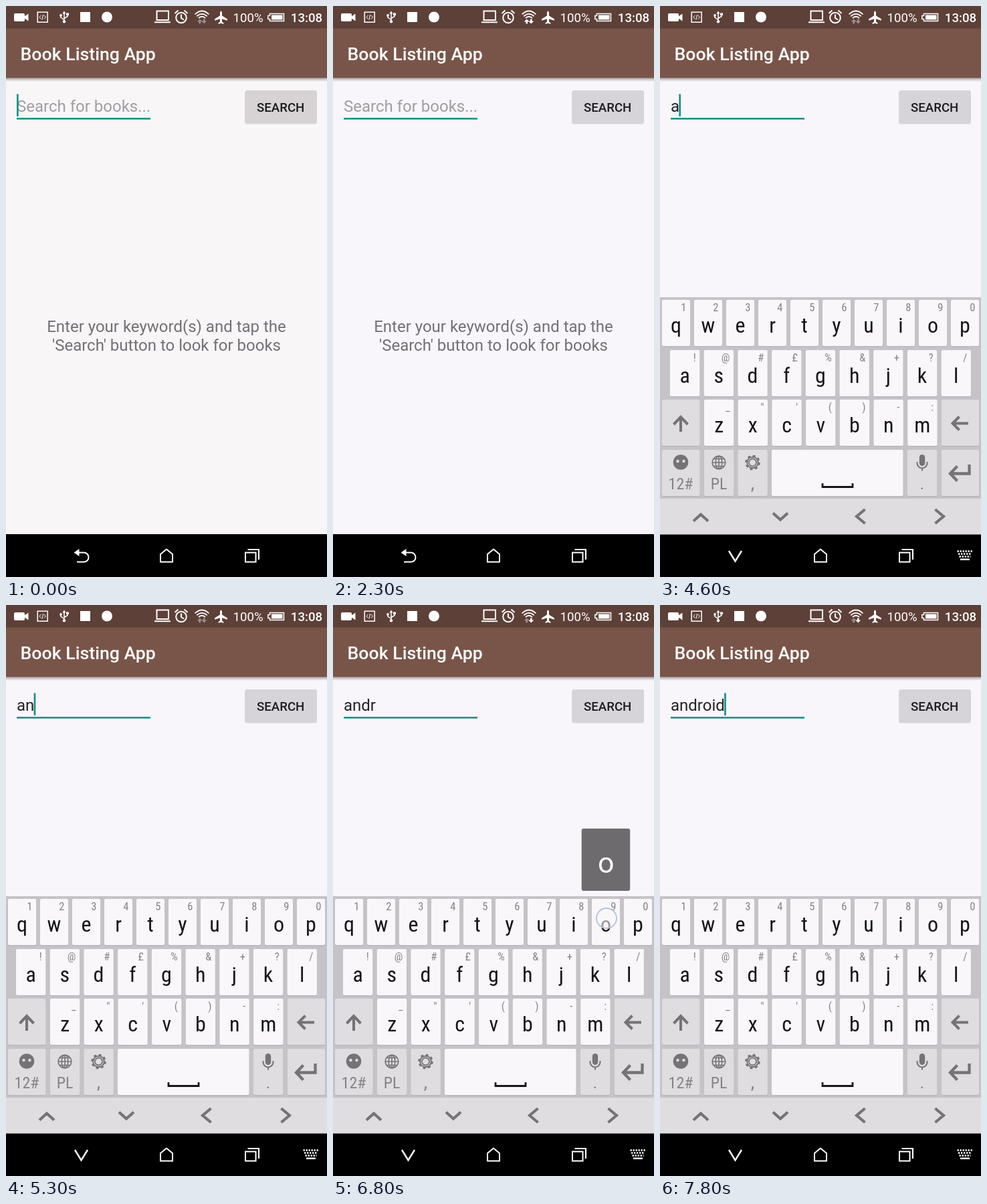
Recreate the animation shown at these times as an HTML page. Size 480 by 853 pixels, loop 8000 ms.

```html
<!DOCTYPE html>
<html lang="en">
<head>
<meta charset="utf-8">
<title>Book search</title>
<style>
  html, body { margin: 0; width: 100%; height: 100%; overflow: hidden; background: #000; }
  svg { display: block; width: 100%; height: 100%; font-family: Roboto, "Noto Sans", sans-serif; }
  .medium { font-weight: 500; }
  .mid { text-anchor: middle; }
  .end { text-anchor: end; }
  .line { fill: none; }
  .keys { font-family: "Roboto Condensed", Roboto, sans-serif; font-stretch: 75%; }
</style>
</head>
<body>
<svg id="stage" viewBox="0 0 480 853">
  <defs>
    <linearGradient id="shade" x2="0" y2="1">
      <stop stop-color="#000" stop-opacity=".34"/>
      <stop offset="1" stop-color="#000" stop-opacity="0"/>
    </linearGradient>
  </defs>

  <rect id="page" width="480" height="790"/>
  <rect y="107" width="480" height="6" fill="url(#shade)"/>
  <rect y="33" width="480" height="74.5" fill="#795549"/>
  <rect width="480" height="33.5" fill="#5d4038"/>
  <text class="medium" x="21.5" y="81" font-size="26.67" fill="#fff">Book Listing App</text>

  <g id="status" fill="#fff" stroke="none">
    <rect x="12" y="11" width="16" height="12" rx="2"/>
    <path d="M27 16l6.500-4.500v11l-6.500-4.500z"/>
    <rect class="line" x="47.200" y="9.200" width="15" height="15" stroke="#fff" stroke-width="1.500"/>
    <path class="line" d="M52.500 14l-2.700 2.700 2.700 2.700M57 14l2.700 2.700-2.700 2.700M55.700 13l-1.800 7.500" stroke="#fff"/>
    <path class="line" d="M87 10v13M87 20.500l-5-3.500v-3M87 18.500l5-3v-3" stroke="#fff" stroke-width="1.500"/>
    <path d="M87 7.500l2.600 4h-5.200zM90 10.500h4v3.500h-4z"/>
    <circle cx="82" cy="14" r="1.900"/><circle cx="87" cy="23.300" r="2.200"/>
    <rect x="111" y="9" width="15" height="15"/>
    <circle cx="151" cy="16.500" r="8"/>
    <path class="line" d="M225.500 7.500h17.500v13.500h-17.500zM222 24.300h24" stroke="#fff" stroke-width="2"/>
    <g class="line" stroke="#fff" stroke-width="2">
      <circle cx="262" cy="17.500" r="7.800"/>
      <path d="M262 12.500v5.500l4 2.500M252.500 11l5-4.500M271.500 11l-5-4.500"/>
    </g>
    <g class="line" stroke="#fff" stroke-width="1.700">
      <path d="M282.500 12.500q10.500-10 21 0M285.300 15.300q7.700-7 15.400 0M288 18q5-4.500 10 0"/>
    </g>
    <path id="up" d="M289.700 19.500l4 4h-2.700v3h-2.600v-3h-2.700z"/>
    <path id="down" d="M296.300 26.500l4-4h-2.700v-3h-2.600v3h-2.700z"/>
    <path d="M320 9.500q1.500-4 3 0v5l8 5v2.200l-8-2.500v4.300l2.400 1.800v1.700l-3.900-1.200-3.900 1.200v-1.700l2.400-1.800v-4.300l-8 2.500v-2.200l8-5z"/>
    <text x="339.500" y="24" font-size="18.670">100%</text>
    <path class="line" d="M394.500 11.500h21v11h-21v-3h-2.700v-5h2.700z" stroke="#fff" stroke-width="1.500"/>
    <rect x="397" y="13.500" width="16.500" height="7"/>
    <text class="medium" x="425.800" y="24" font-size="18.670">13:08</text>
  </g>

  <text id="field" x="16" y="158" font-size="24"></text>
  <rect x="16" y="167" width="200" height="2.600" fill="#159389"/>
  <rect id="cursor" y="131.500" width="2.700" height="33.500" fill="#159389"/>

  <rect x="357" y="126.500" width="108" height="50" rx="3.500" fill="#000" opacity=".13"/>
  <rect id="button" x="358" y="126" width="106.500" height="48.500" rx="2.500"/>
  <text class="medium mid" x="410.700" y="157.500" font-size="18.670" fill="#1c1b1d">SEARCH</text>

  <g class="mid" font-size="24" fill="#727074">
    <text x="240" y="487">Enter your keyword(s) and tap the</text>
    <text x="240" y="515">'Search' button to look for books</text>
  </g>

  <rect y="789" width="480" height="64" fill="#000"/>
  <g id="board"></g>

  <g class="line" stroke="#fff" stroke-width="2">
    <g id="back">
      <path d="M106 816.500h10.500a6.800 6.800 0 0 1 0 14h-10.500"/>
      <path d="M101.500 816.500l8-5.500v11z" fill="#fff" stroke="none"/>
    </g>
    <path id="hide" d="M103 814l9.500 15.500 9.500-15.500" stroke-width="2.400"/>
    <path d="M231 830.500v-11.500l9-7.500 9 7.500v11.500z"/>
    <path d="M358 816.500h15.500v14h-15.500zM361.500 812h16.500v15"/>
    <g id="switcher" stroke-width="2.400">
      <path d="M444.500 814.500h23M446 818.500h20M447.500 822.500h17" stroke-dasharray="2.400 1.600"/>
      <path d="M449 826.700h14"/>
    </g>
  </g>

  <g id="popup">
    <rect width="72.500" height="93" rx="3" fill="#6d6b6e"/>
    <text id="bubble" class="mid" x="36.500" y="66" font-size="43" fill="#fff"></text>
  </g>
  <circle id="touch" r="15" fill="#f9f7fb" fill-opacity=".58" stroke="#b6c0dc" stroke-width="1.800"/>
</svg>

<script>
const $ = id => document.getElementById(id);
const set = (id, attrs) => {
  for (const k in attrs) $(id).setAttribute(k, attrs[k]);
};
const show = (id, on) => set(id, { visibility: on ? "visible" : "hidden" });

const LOOP = 8000, STEP = 100, BLINK = 500;
const LIGHT = "#f9f7fa", DULL = "#dfdde0", GREY = "#757376";
const keys = {};

// Keyboard
function plate(x, y, w, fill) {
  return `<rect x="${x}" y="${y + 1.2}" width="${w}" height="69" rx="2" fill="#b5b3b7"/>
    <rect x="${x}" y="${y}" width="${w}" height="69" rx="2" fill="${fill}"/>`;
}

function letterRow(letters, marks, x0, pitch, w, y) {
  return [...letters].map((c, i) => {
    const x = x0 + i * pitch;
    keys[c] = { x: x + w / 2, y };
    return plate(x, y, w, LIGHT) +
      `<text class="mid" x="${x + w / 2}" y="${y + 48.5}" font-size="32" fill="#161517">${c}</text>
       <text class="end" x="${x + w - 5.5}" y="${y + 16.5}" font-size="16.500" fill="#858386">${marks[i]}</text>`;
  }).join("");
}

function label(s, x, size = 24) {
  return `<text class="mid" x="${x}" y="722" font-size="${size}" fill="#858386">${s}</text>`;
}

function stroke(d, width, color = GREY) {
  return `<path class="line" d="${d}" stroke="${color}" stroke-width="${width}"/>`;
}

function buildBoard() {
  const side = [[3, 588, 56.5], [421, 588, 56], [3, 663, 56.5], [66, 663, 44.3],
    [116.5, 663, 44.3], [370, 663, 44.3], [421, 663, 56]];
  $("board").innerHTML = `<rect y="435" width="480" height="302" fill="#c5c3c7"/>
    <rect y="736" width="480" height="53.500" fill="${DULL}"/>
    <g class="keys">` +
    letterRow("qwertyuiop", "1234567890", 3, 48, 42, 439) +
    letterRow("asdfghjkl", "!@#£%&amp;+?/".replace("&amp;", "&"), 15, 50.7, 44.3, 514) +
    letterRow("zxcvbnm", "_\"'()-:", 66, 50.7, 44.3, 588) +
    side.map(([x, y, w]) => plate(x, y, w, DULL)).join("") +
    plate(167, 663, 196.5, LIGHT) +
    label("12#", 31) + label("PL", 88) + label(",", 138.5, 27) + label(".", 392) + "</g>" +
    stroke("M31 636v-22M20.500 625l10.500-11 10.500 11", 4) +
    stroke("M461 623.500h-23M447.500 613.500l-10 10 10 10", 4) +
    stroke("M462.500 685v13.500h-28M444.500 687.500l-10.500 11 10.500 11", 4.3) +
    stroke("M243 713v5.500h45v-5.500", 2.8, "#161517") +
    `<circle cx="31" cy="681.500" r="11.300" fill="${GREY}"/>
     <circle cx="26.500" cy="680" r="2.200" fill="${DULL}"/><circle cx="35.500" cy="680" r="2.200" fill="${DULL}"/>
     <g class="line" stroke="${GREY}" stroke-width="1.600">
       <circle cx="88" cy="682" r="9.800"/><ellipse cx="88" cy="682" rx="4.800" ry="9.800"/>
       <path d="M88 672v20M78 682h20M80 676.500h16M80 687.500h16"/>
       <circle cx="138.500" cy="682" r="5.500" stroke-width="1.800"/>
       <circle cx="138.500" cy="682" r="8.300" stroke-width="2"/>
       <circle cx="138.500" cy="682" r="10" stroke-width="2.600" stroke-dasharray="3.930 3.930"/>
       <path d="M384.500 681v2a7.500 7.500 0 0 0 15 0v-2M392 690.500v4" stroke-width="2"/>
     </g>
     <rect x="387.800" y="670" width="8.400" height="17" rx="4.200" fill="${GREY}"/>` +
    stroke("M50 769.500l11-10 11 10M169 757.500l11 10 11-10M306.500 752l-12.500 10.500 12.500 10.500M411.500 752l12.500 10.500-12.500 10.500", 4.2);
}

// Typing: key, time pressed, time the letter lands
const presses = [["a", 4300, 4400], ["n", 5000, 5100], ["d", 5700, 5800], ["r", 6100, 6100],
  ["o", 6800, 6900], ["i", 7100, 7200], ["d", 7500, 7600]];
const FOCUS = 3300;

function mix(a, b, p) {
  return `rgb(${a.map((v, i) => Math.round(v + (b[i] - v) * p))})`;
}

function drawField(t) {
  const landed = presses.filter(p => p[2] <= t);
  const typed = landed.map(p => p[0]).join("");
  const field = $("field");
  field.textContent = typed || "Search for books...";
  set("field", { fill: typed ? "#232224" : "#a09ea1" });
  const since = typed ? t - landed[landed.length - 1][2] : t + 200;
  set("cursor", { x: typed ? 15.3 + field.getComputedTextLength() : 16 });
  show("cursor", since % (2 * BLINK) < BLINK);
}

function drawTouch(t) {
  const press = presses.find(p => t >= p[1] && t < p[2] + 200);
  show("popup", press && t < press[2] + 100);
  let x = 162, y = 150, alpha = 0;
  if (press) {
    const key = keys[press[0]];
    x = key.x + 1;
    y = key.y + 29;
    alpha = t < press[2] + 100 ? 1 : 0.5;
    $("bubble").textContent = press[0];
    set("popup", { transform: `translate(${Math.max(6, key.x - 36.3)} ${key.y - 105})` });
  } else if (t >= FOCUS && t < FOCUS + 300) {
    alpha = [1, 0.6, 0.25][(t - FOCUS) / STEP];
  }
  set("touch", { cx: x, cy: y, opacity: alpha });
}

function drawBoard(t) {
  const open = t >= FOCUS;
  const rise = Math.min(1, Math.max(0, (t - FOCUS) / 300));
  show("board", open);
  show("back", !open);
  show("hide", open);
  show("switcher", open);
  set("board", {
    transform: `translate(0 ${34.5 * (1 - rise)})`,
    opacity: Math.min(1, Math.max(0, (t - 3250) / 260))
  });
}

function draw(now) {
  const t = Math.floor((now % LOOP) / STEP) * STEP;
  const cool = Math.min(1, t / 1600);
  set("page", { fill: mix([248, 246, 247], [248, 246, 250], cool) });
  set("button", { fill: mix([215, 211, 212], [214, 212, 217], cool) });
  const both = t >= 1700 && t < 3900;
  set("up", { opacity: both ? 1 : 0.4 });
  set("down", { opacity: both || t >= 5600 ? 1 : 0.4 });
  drawField(t);
  drawBoard(t);
  drawTouch(t);
}

buildBoard();
const start = performance.now();
function tick() {
  draw(performance.now() - start);
  requestAnimationFrame(tick);
}
tick();
</script>
</body>
</html>
```
